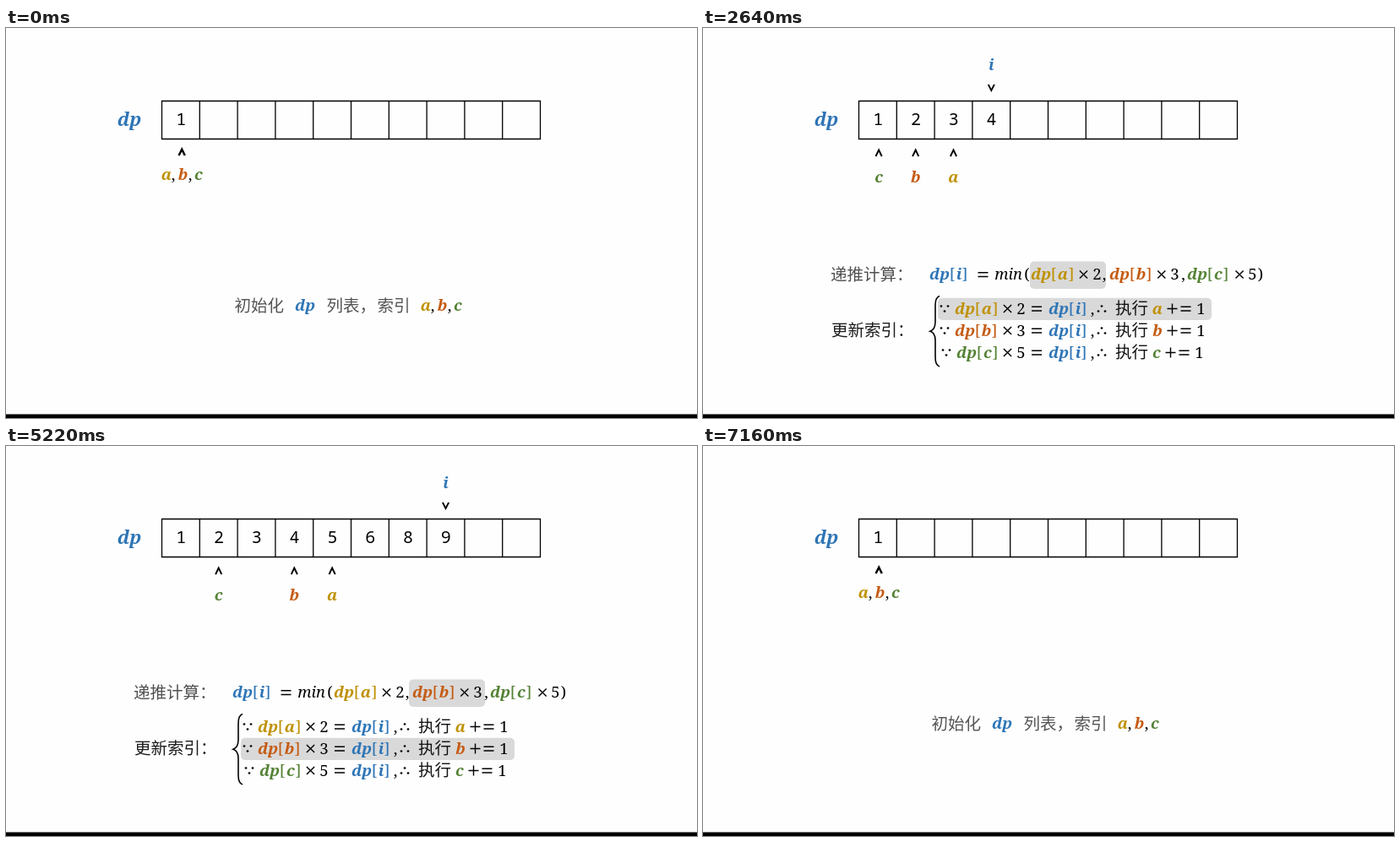
Write an HTML page that moves like this. It is 818 by 462 pixels and loops after 7260 ms.

```html
<!DOCTYPE html>
<html lang="zh-CN">
<head>
<meta charset="utf-8">
<title>dp</title>
<style>
html, body { margin: 0; width: 100%; height: 100%; overflow: hidden; background: #fefefe; }
svg { display: block; width: 818px; height: 462px; }
text { white-space: pre; }
.v, .m { font-family: "Noto Serif", serif; text-anchor: middle; }
.v { font-weight: 700; font-style: italic; }
.n { font-family: "Noto Sans Mono", monospace; font-size: 20px; text-anchor: middle; }
.zh { font-family: "Noto Sans CJK SC", "Noto Sans CJK", sans-serif; font-weight: 300; }
.line { fill: none; stroke: #000; }
.hl { fill: #d9d9d9; }
</style>
</head>
<body>
<svg id="stage" viewBox="0 0 818 462">
  <rect width="818" height="462" fill="#fefefe"/>
  <g id="table"></g>
  <g id="scene"></g>
  <rect y="457.5" width="818" height="4.5"/>
</svg>
<script>
const LOOP = 7260;
const STARTS = [0, 1340, 1980, 2640, 3280, 3920, 4560, 5220, 5860, 6520, 7160];
const COLOR = { a: '#bf9000', b: '#c55a11', c: '#548235', i: '#2e75b6' };
const WIDTH = { a: 12, b: 11, c: 10, i: 6 };
const FACTOR = { a: 2, b: 3, c: 5 };
const KEYS = ['a', 'b', 'c'];
const CELL = 44.8, LEFT = 184.5;
const NOTE_SCENE = 5;

const mid = k => LEFT + CELL * (k + 0.5);

// Drawing helpers return SVG markup
const text = (cls, x, y, s, size, fill = '#000', extra = '') =>
  `<text class="${cls}" x="${x}" y="${y}" font-size="${size}" fill="${fill}" ${extra}>${s}</text>`;
const sym = (x, y, s, size = 18.5) => text('m', x, y, s, size);
const bold = (x, y, s, fill, size = 18.5) => text('v', x, y, s, size, fill);
const letter = (x, y, k) => bold(x, y, k, COLOR[k]);
const zh = (x, y, s, size, fill, extra) => text('zh', x, y, s, size, fill, extra);
const path = (d, w) => `<path class="line" d="${d}" stroke-width="${w}"/>`;
const box = (x, y, w, h) => `<rect class="hl" x="${x}" y="${y}" width="${w}" height="${h}" rx="5"/>`;
const times = (x, y, r = 4.6) =>
  path(`M${x - r} ${y - r}l${2 * r} ${2 * r}M${x - r} ${y + r}l${2 * r} ${-2 * r}`, 1.4);
const equals = (x, y) => path(`M${x - 6} ${y - 2.3}h12m-12 4.8h12`, 1.4);
const plus = (x, y) => path(`M${x - 6} ${y}h12m-6 -6v12`, 1.4);
const caret = (x, y, h, w = 1.9) => path(`M${x - 3.6} ${y + h}L${x} ${y}L${x + 3.6} ${y + h}`, w);
const dots = (x, y, flip) => [[-4, -1], [4, -1], [0, 1]].map(([dx, s]) =>
  `<circle cx="${x + dx}" cy="${y + s * flip * 3}" r="1.35"/>`).join('');

function ref(x, y, k, s = 1) {
  const c = COLOR[k], w = WIDTH[k], size = 18.5 * s;
  return bold(x + 12 * s, y, 'dp', c, size) +
    text('m', x + 27 * s, y, '[', size, c) +
    bold(x + (32 + w / 2) * s, y, k, c, size) +
    text('m', x + (36 + w) * s, y, ']', size, c);
}

function ruleRow(k, n) {
  const y = 339 + 26 * n, c = y - 6.5, d = k === 'c' ? -2 : 0;
  return dots(286 - d, c, 1) + ref(298 - d, y, k) + times(360.5, c) + sym(376.5, y, FACTOR[k]) +
    equals(395, c) + ref(409, y, 'i') + sym(461, y, ',') + dots(472, c, -1) +
    zh(488, y, '执行', 19.5, '#111') + letter(538 + d / 2, y, k) +
    plus(555.5 + d, c) + equals(571.5 + d, c) + sym(589.5 + d, y, '1');
}

function formulas(hits) {
  const y = 298;
  let out = '';
  KEYS.forEach((k, n) => {
    if (hits.includes(k)) out += box(387 + 90 * n, 276.5, 90, 32.5) + box(278, 319.7 + 26.1 * n, 324, 26.3);
  });
  out += zh(151, 299, '递推计算：', 19.5, '#505050') + ref(268, y, 'i') + equals(331.5, 292) +
    text('m', 361.5, y, 'min', 18.2, '#000', 'font-style="italic"') + sym(383.5, y, '(');
  KEYS.forEach((k, n) => {
    const x = [388, 481, 573][n];
    out += ref(x, y, k) + times(450.5 + 92.3 * n, 292) + sym(466.5 + 92 * n, y, FACTOR[k]) +
      sym([475, 568.5, 660][n], y, n < 2 ? ',' : ')');
  });
  return out + zh(152, 364.5, '更新索引：', 19.5, '#1c1c1c') +
    path('M280 317.5Q275 319 275 329V348Q275 357 269 359.2Q275 361 275 370V390Q275 399.5 280 401', 1.6) +
    KEYS.map(ruleRow).join('');
}

function note() {
  const y = 432, s = 0.88;
  return '<rect x="96.5" y="410.7" width="629.5" height="30.3" fill="#fefefe" stroke="#12a182" stroke-width="1.4"/>' +
    zh(109, 432.5, '注意：', 17.5, '#222', 'style="font-weight:700"') + zh(161, 432.5, '此处由于', 17.5, '#333') +
    ref(242, y, 'a', s) + times(297, 426.5, 4) + sym(310.5, y, '2', 16.5) + sym(318.5, y, ',', 16.5) +
    ref(322.5, y, 'b', s) + times(378, 426.5, 4) + sym(392, y, '3', 16.5) +
    zh(408, 432.5, '都等于', 17.5, '#333') + ref(471, y, 'i', s) + zh(520, 432.5, '，', 17.5, '#333') +
    zh(540, 432.5, '因此两索引都需要加一', 17.5, '#333');
}

const triple = (x, y) => letter(x, y, 'a') + sym(x + 8, y, ',') + letter(x + 19.5, y, 'b') +
  sym(x + 28, y, ',') + letter(x + 38, y, 'c');

function pointers(at) {
  const groups = {};
  KEYS.forEach(k => (groups[at[k]] ||= []).push(k));
  return Object.entries(groups).map(([cell, ks]) => {
    const x = mid(+cell) + (cell === '0' ? 1.2 : 0);
    const names = ks.length > 1
      ? letter(x - 9.7, 183, ks[0]) + sym(x - 1.7, 183, ',') + letter(x + 9.3, 183, ks[1])
      : letter(x, 183, ks[0]);
    return caret(x, 144.5, 7.5) + names;
  }).join('');
}

const digits = list => list.map((v, k) =>
  `<text class="n" x="${mid(k) + 0.3}" y="115.3">${v}</text>`).join('');

// Each scene appends the next number and advances the matching indices
function buildScenes() {
  const dp = [1], at = { a: 0, b: 0, c: 0 };
  const scenes = [digits(dp) + caret(208.2, 143.8, 7.2, 2.5) + triple(190, 180) +
    zh(270.5, 335.5, '初始化', 19.5, '#555') + bold(354, 335, 'dp', COLOR.i) +
    zh(379.5, 335.5, '列表，', 19.5, '#555') + zh(439.5, 335.5, '索引', 19.5, '#555') + triple(497, 335)];
  for (let i = 1; i < 10; i++) {
    const next = k => dp[at[k]] * FACTOR[k];
    const value = Math.min(...KEYS.map(next));
    const hits = KEYS.filter(k => next(k) === value);
    dp.push(value);
    hits.forEach(k => at[k]++);
    scenes.push(digits(dp) + letter(mid(i), 49.5, 'i') + caret(mid(i), 74, -7.2) +
      pointers(at) + formulas(hits) + (i === NOTE_SCENE ? note() : ''));
  }
  return scenes;
}

let grid = `M${LEFT} 86.5H632.5V131.5H${LEFT}Z`;
for (let k = 1; k < 10; k++) grid += `M${LEFT + CELL * k} 86.5v45`;
document.getElementById('table').innerHTML = path(grid, 1.3) + bold(146, 116, 'dp', COLOR.i, 22);

const scenes = buildScenes(), layer = document.getElementById('scene');
let shown = -1;
function tick() {
  const t = performance.now() % LOOP;
  const n = STARTS.filter(s => s <= t).length - 1;
  if (n !== shown) layer.innerHTML = scenes[n % scenes.length];
  shown = n;
  requestAnimationFrame(tick);
}
tick();
</script>
</body>
</html>
```
